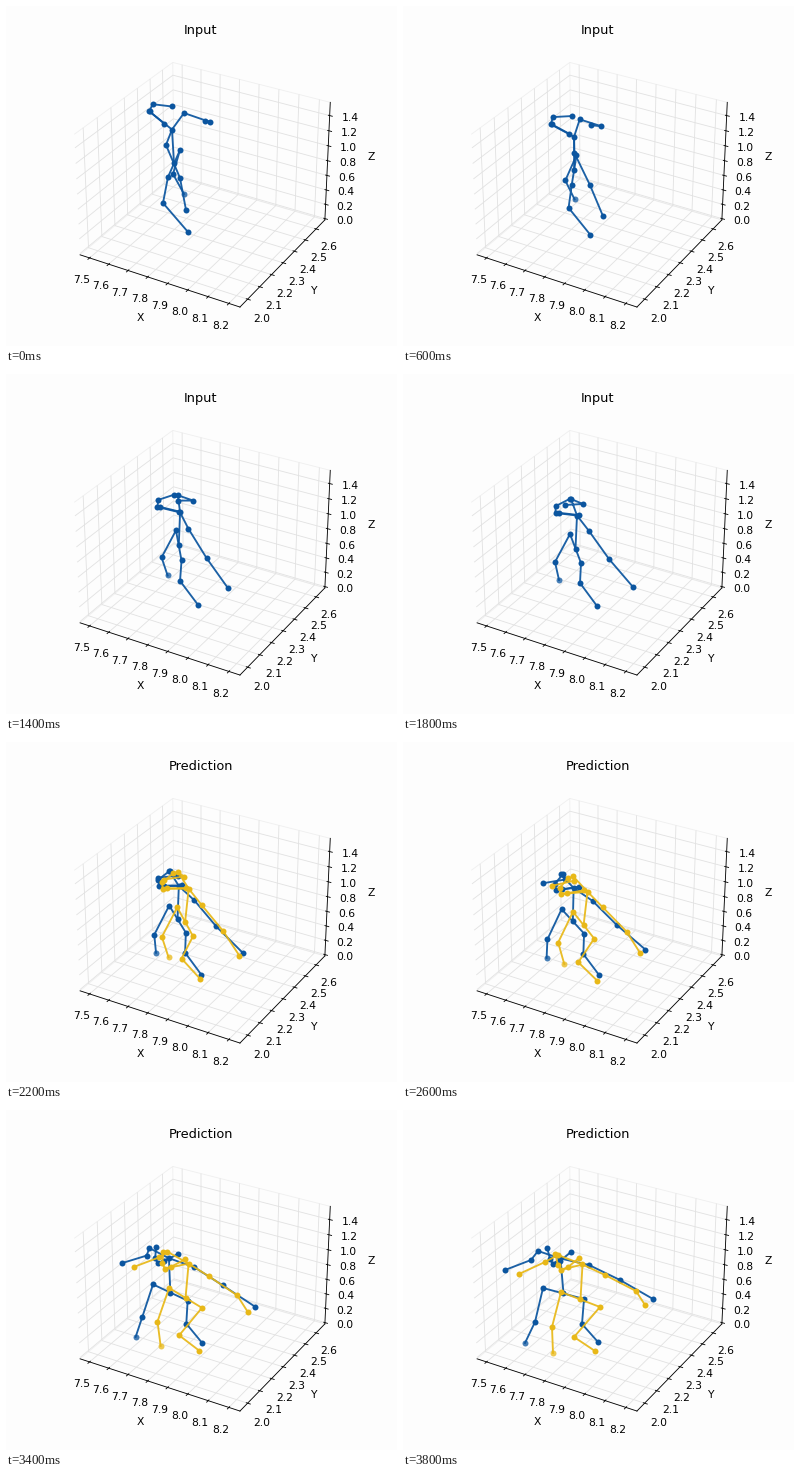
A matplotlib script that plays this animation: 391x340 px, repeating every 4 s.

```python
import numpy as np
import matplotlib.pyplot as plt
from matplotlib.animation import FuncAnimation

W, H, DPI = 391, 340, 77
STEP, FRAMES = 200, 20
LAST_INPUT, SPLIT, END = 1800, 2000, 3800
BLUE, GOLD, PAPER, GRID = "#0b559f", "#e8b818", "#fdfdfd", "#e2e2e2"

plt.rcParams.update({"font.family": "DejaVu Sans", "font.size": 10,
                     "grid.color": GRID, "grid.linewidth": 0.8})

# Screen position at the start, at the last input and at the end,
# then how far the prediction has drifted off by the end.
JOINTS = {
    "head": [(162, 109), (171, 133), (156, 140), (8, 6)],
    "l_sho": [(160, 139), (186, 157), (186, 155), (16, 10)],
    "l_elb": [(174, 172), (206, 185), (217, 170), (16, 11)],
    "l_wri": [(180, 204), (230, 213), (250, 189), (-8, 6)],
    "r_sho": [(178, 107), (168, 125), (135, 141), (20, 4)],
    "r_elb": [(204, 116), (180, 130), (128, 150), (14, 2)],
    "r_wri": [(199, 115), (162, 131), (102, 160), (14, 4)],
    "l_hip": [(162, 171), (178, 189), (181, 189), (16, 8)],
    "l_kne": [(157, 197), (177, 209), (179, 214), (-8, 13)],
    "l_ank": [(182, 226), (194, 232), (195, 232), (-3, 9)],
    "r_hip": [(174, 144), (167, 160), (140, 178), (18, 4)],
    "r_kne": [(167, 168), (152, 188), (132, 212), (17, 5)],
    "r_ank": [(178, 188), (156, 206), (122, 233), (28, 10)],
}
YAW = np.radians([-40, 0, 51])
EAR, FACE, DEPTH = np.array([4.5, 8]), np.array([-18.5, 6]), 0.62

CHAINS = [
    ["l_wri", "l_elb", "l_sho", "neck", "r_sho", "r_elb", "r_wri"],
    ["l_ank", "l_kne", "l_hip", "pelvis", "r_hip", "r_kne", "r_ank"],
    ["l_ear", "l_eye", "nose", "r_eye", "r_ear"],
    ["nose", "neck", "pelvis"],
]
DOTS = sorted({name for chain in CHAINS for name in chain} - {"r_ank"})


def arc(t, points):
    """Parabola through three values over the loop."""
    a, b, c = np.polyfit([0, LAST_INPUT / 1000, END / 1000], points, 2)
    s = t / 1000
    return (a * s + b) * s + c


def pose(t, drift=0):
    p = {name: arc(t, keys[:3]) + drift * np.array(keys[3])
         for name, keys in JOINTS.items()}
    p["neck"] = (p["l_sho"] + p["r_sho"]) / 2 + (-3 + 4 * drift, 0.5 - drift)
    p["pelvis"] = (p["l_hip"] + p["r_hip"]) / 2

    # The head turns about the vertical, seen as an ellipse.
    yaw = arc(t, YAW)
    ear = EAR * np.cos(yaw) - FACE * DEPTH * np.sin(yaw)
    face = FACE * np.cos(yaw) + EAR / DEPTH * np.sin(yaw)
    p["nose"] = p["head"] + face
    for side, sign in (("l", 1), ("r", -1)):
        p[side + "_ear"] = p["head"] + sign * ear
        p[side + "_eye"] = p["nose"] + (2, -3.5) + sign * 0.42 * ear
    return p


class Skeleton:
    def __init__(self, ax, color, z):
        self.lines = [ax.plot([], [], color=color, lw=1.75, alpha=0.93, zorder=z)[0]
                      for _ in CHAINS]
        style = dict(ls="", marker="o", ms=5.6, mew=0, color=color, zorder=z + 1)
        self.dots = ax.plot([], [], **style)[0]
        self.far = ax.plot([], [], alpha=0.75, **style)[0]

    def show(self, p):
        for line, chain in zip(self.lines, CHAINS):
            line.set_data(*np.transpose([p[name] for name in chain]))
        self.dots.set_data(*np.transpose([p[name] for name in DOTS]))
        self.far.set_data(*p["r_ank"][:, None])

    def hide(self):
        for artist in (*self.lines, self.dots, self.far):
            artist.set_data([], [])


fig = plt.figure(figsize=(W / DPI, H / DPI), dpi=DPI, facecolor=PAPER)

side = 284.6
box = fig.add_axes([52.6 / W, 21 / H, side / W, side / H], projection="3d")
box.set_facecolor("none")
box.set(xlim=(7.45, 8.253), ylim=(1.938, 2.684), zlim=(-0.018, 1.572),
        xlabel="X", ylabel="Y", zlabel="Z",
        xticks=np.arange(75, 83) / 10, yticks=np.arange(20, 27) / 10,
        zticks=np.arange(0, 15, 2) / 10)
for axis in (box.xaxis, box.yaxis, box.zaxis):
    axis.pane.set_facecolor("none")
    axis.pane.set_edgecolor(GRID)
    axis.pane.set_linewidth(0.8)
title = box.set_title("Input", fontsize=12)

stage = fig.add_axes([0, 0, 1, 1])
stage.set(xlim=(0, W), ylim=(H, 0))
stage.set_axis_off()

truth = Skeleton(stage, BLUE, 3)
guess = Skeleton(stage, GOLD, 6)


def draw(i):
    t = i * STEP
    truth.show(pose(t))
    if t < SPLIT:
        title.set_text("Input")
        guess.hide()
    else:
        title.set_text("Prediction")
        guess.show(pose(t, np.sqrt((t - LAST_INPUT) / (END - LAST_INPUT))))


anim = FuncAnimation(fig, draw, frames=FRAMES, interval=STEP, init_func=lambda: draw(0),
                     repeat=True, repeat_delay=0, blit=False)
plt.show()
```
